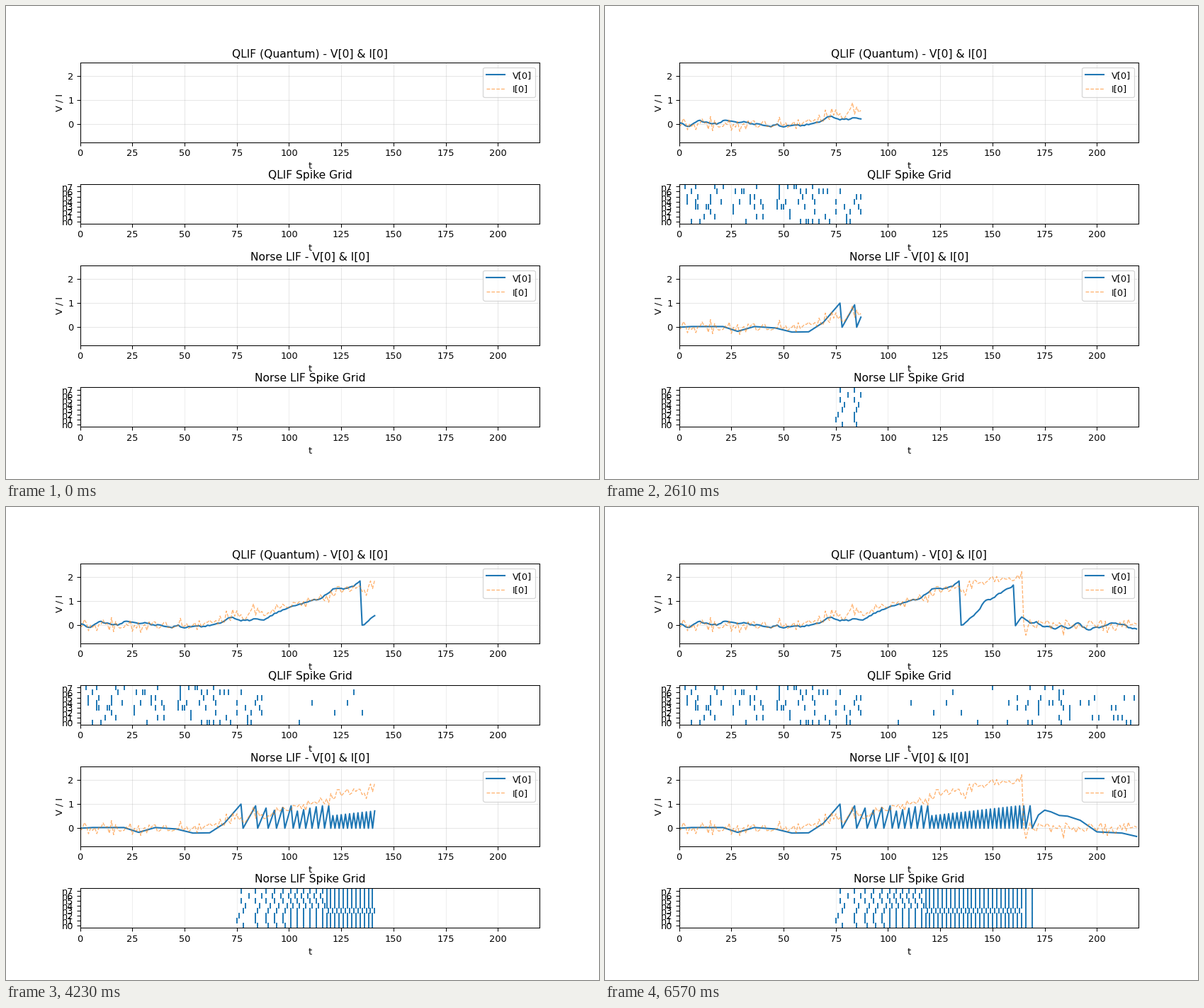
Write a matplotlib script that moves like this. It is 837x669 px and loops after 6.6 s.

```python
import numpy as np
import matplotlib.pyplot as plt
from matplotlib.animation import FuncAnimation

plt.rcParams["font.family"] = "DejaVu Sans"
STEPS, NEURONS = 220, 8
RAMP_END = 165
t = np.arange(STEPS)
rng = np.random.default_rng(4)


def curve(*keys):
    return np.interp(t, *np.array(keys).T)


def gap(s):
    """Steps to the next spike; shrinks as the input ramps up."""
    return max(2, round(1 + 82.1 / (s - 64.2)))


def spike_chain(first, stop):
    times = [first]
    while times[-1] + gap(times[-1]) < stop:
        times.append(times[-1] + gap(times[-1]))
    return times


# Noisy input: rest, ramp, sudden drop.
current = curve((0, 0), (60, 0), (75, .45), (100, .75), (150, 1.9),
                (164, 1.95), (165, 0), (219, 0)) + rng.normal(0, .14, STEPS)

# Quantum neuron: slow charge with two resets and a little wander.
wander = np.convolve(rng.normal(0, .06, STEPS), np.ones(3) / 3, "same")
qlif_v = wander + curve(
    (0, -.04), (5, -.05), (10, .18), (15, 0), (22, .13), (42, -.08),
    (62, -.05), (70, .22), (88, .23), (95, .6), (116, 1.15), (121, 1.48),
    (128, 1.48), (134, 1.8), (135, 0), (141, .4), (146, .95), (160, 1.7),
    (161, 0), (164, .36), (175, -.05), (187, -.1), (191, .08), (196, -.2),
    (207, .1), (219, -.15))

# Classical neuron: sawtooth whose charging rate grows with the ramp.
peaks = spike_chain(77, RAMP_END + 1) + [RAMP_END + 3]
saw = [(77, 1), (78, 0)]
for prev, p in zip(peaks, peaks[1:]):
    height = (p - prev - 1) * (.16 + .0098 * (p - 84))
    saw += [(p, min(height, .93)), (p + 1, 0)]
norse_v = curve(
    (0, 0), (6, .03), (21, .03), (28, -.17), (36, .03), (46, -.03),
    (54, -.2), (62, -.19), (69, .2), *saw, (172, .55), (175, .75),
    (178, .68), (182, .53), (186, .5), (192, .33), (200, -.15),
    (212, -.2), (219, -.34))

# Random spikes, sparse during the ramp.
rate = np.select([t < 3, t < 90, t < RAMP_END], [0, .1, .027], .085)
qlif_spikes = [t[rng.random(STEPS) < rate] for _ in range(NEURONS)]

# Staggered starts that lock into step; one neuron stays out of phase.
norse_spikes = []
for k, first in enumerate([78, 75, 76, 78, 79, 77, 81, 77]):
    locked = range(118 + (k == 3), RAMP_END, 2)
    norse_spikes.append([*spike_chain(first, 118), *locked,
                         RAMP_END + 1, RAMP_END + 4])

fig, axes = plt.subplots(
    4, 1, figsize=(9, 7.195), dpi=93,
    gridspec_kw=dict(height_ratios=[2, 1, 2, 1], hspace=0.7))


def base(ax, title):
    ax.set_title(title)
    ax.set_xlabel("t")
    ax.set_xlim(0, STEPS)


def trace_panel(ax, title):
    base(ax, title)
    ax.set_ylabel("V / I")
    ax.set_ylim(-0.75, 2.55)
    ax.grid(alpha=0.3)
    v, = ax.plot([], [], color="tab:blue", lw=1.6, label="V[0]")
    i, = ax.plot([], [], "--", color="tab:orange", lw=1, alpha=0.6,
                 label="I[0]")
    ax.legend(loc="upper right")
    return v, i


def spike_panel(ax, title, spikes):
    base(ax, title)
    ax.set_ylim(-0.5, NEURONS - 0.5)
    ax.set_yticks(range(NEURONS), [f"n{k}" for k in range(NEURONS)])
    ax.grid(axis="x", alpha=0.2)
    marks, = ax.plot([], [], "|", color="tab:blue", ms=6, mew=1.5)
    return marks, np.array([(s, k) for k, row in enumerate(spikes)
                            for s in row])


traces = [(trace_panel(axes[0], "QLIF (Quantum) - V[0] & I[0]"), qlif_v),
          (trace_panel(axes[2], "Norse LIF - V[0] & I[0]"), norse_v)]
grids = [spike_panel(axes[1], "QLIF Spike Grid", qlif_spikes),
         spike_panel(axes[3], "Norse LIF Spike Grid", norse_spikes)]


def update(n):
    for (v, i), volt in traces:
        v.set_data(t[:n + 1], volt[:n + 1])
        i.set_data(t[:n + 1], current[:n + 1])
    for marks, pts in grids:
        shown = pts[pts[:, 0] <= n]
        marks.set_data(shown[:, 0], shown[:, 1])


anim = FuncAnimation(fig, update, frames=STEPS, interval=30,
                     init_func=lambda: update(0), repeat=True, repeat_delay=0)
plt.show()
```
